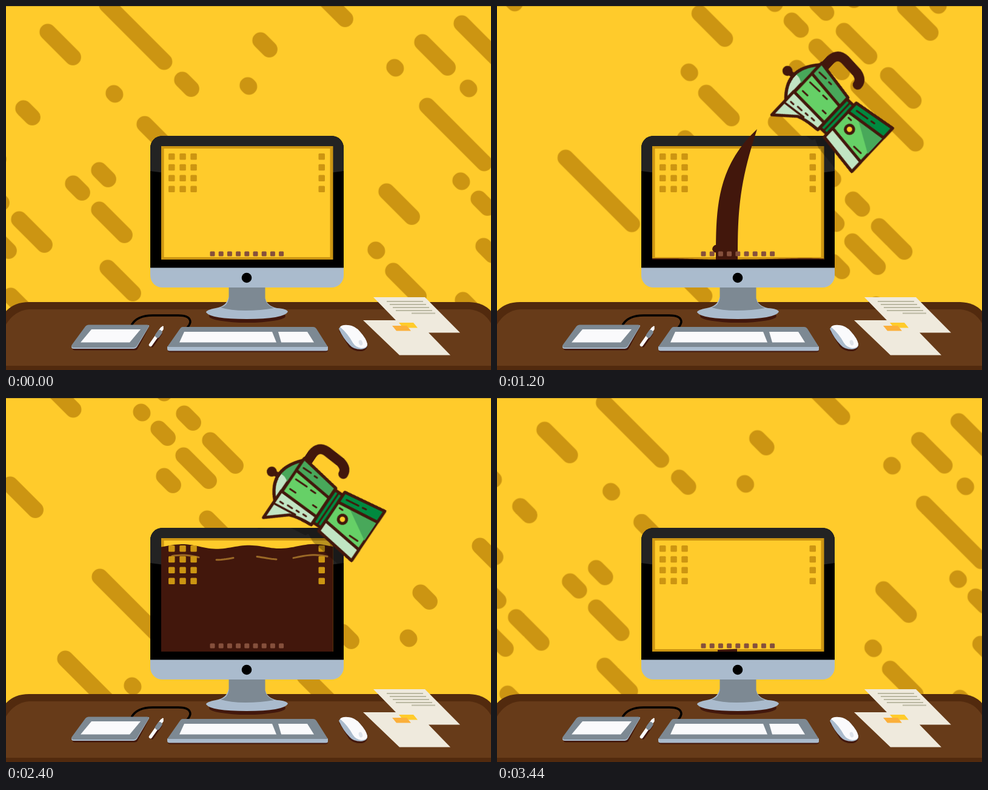
Recreate the animation shown at these times as an HTML page. Size 800 by 600 pixels, loop 3.48 s.

```html
<!DOCTYPE html>
<html lang="en">
<head>
<meta charset="utf-8">
<title>Coffee break</title>
<style>
  html, body { margin: 0; width: 100%; height: 100%; overflow: hidden; background: #ffcb2b; }
  svg { display: block; width: 800px; height: 600px; }

  #drift { animation: drift 3480ms linear infinite; }
  .move { animation: move 3480ms infinite; }
  .tilt { animation: tilt 3480ms infinite; }

  @keyframes drift { to { transform: translate(-851px, -851px); } }
  @keyframes move {
    0%, 6.9% { transform: translate(905px, 180px); animation-timing-function: cubic-bezier(.4, .2, .7, .7); }
    16.09% { transform: translate(680px, 179px); animation-timing-function: cubic-bezier(.3, .5, .5, 1); }
    23%, 64.4% { transform: translate(547px, 175px); animation-timing-function: ease-in-out; }
    68.97% { transform: translate(516.4px, 177.6px); animation-timing-function: cubic-bezier(.5, 0, .8, .7); }
    80.5%, 100% { transform: translate(905px, 180px); }
  }
  @keyframes tilt {
    0%, 10% { transform: rotate(0deg); animation-timing-function: cubic-bezier(.4, 0, .7, .6); }
    16.09% { transform: rotate(-17.5deg); animation-timing-function: cubic-bezier(.3, .5, .5, 1); }
    23%, 64.4% { transform: rotate(-46.7deg); animation-timing-function: ease-in-out; }
    68.97% { transform: rotate(-56deg); animation-timing-function: cubic-bezier(.5, 0, .8, .7); }
    80.5%, 100% { transform: rotate(0deg); }
  }
</style>
</head>
<body>
<svg viewBox="0 0 800 600">
  <defs>
    <clipPath id="case"><rect x="238" y="214" width="319" height="250" rx="20"/></clipPath>
    <clipPath id="screen"><rect x="256" y="231" width="283.500" height="187"/></clipPath>
  </defs>

  <rect width="800" height="600" fill="#ffcb2b"/>
  <g id="drift" fill="none" stroke="#cc9512" stroke-width="27" stroke-linecap="round">
    <g id="pills"></g>
    <use href="#pills" x="851" y="851"/>
  </g>
  <rect width="800" height="1" fill="#000" opacity=".2"/>

  <!-- desk -->
  <path fill="#522a0e" d="M0 503Q14 488 38 488H764Q788 489 800 503V600H0Z"/>
  <path fill="#673b19" d="M0 525Q14 502 38 500H764Q788 502 800 523V593H0Z"/>

  <!-- stand -->
  <ellipse cx="398" cy="511" rx="63" ry="11" fill="#42170c"/>
  <path fill="#aabbcd" d="M367 480Q364 495 346 498Q330 501 330 505Q338 516 397 516Q458 516 465 504Q463 499 447 498Q430 494 428 482Z"/>
  <path fill="#7d8993" d="M367.500 464H427.500V482Q429 493 442 498Q420 502 395 502Q370 502 354 497Q366 494 367.500 482Z"/>

  <!-- monitor -->
  <g clip-path="url(#case)">
    <rect x="238" y="214" width="319" height="218" fill="#000"/>
    <path fill="#232323" d="M238 214H557V272Q397 296 238 272Z"/>
    <rect x="238" y="431.500" width="319" height="33" fill="#aabbcd"/>
  </g>
  <circle cx="397" cy="448" r="8.300"/>
  <rect x="256" y="231" width="283.500" height="187" fill="#cc9512"/>
  <rect x="260.500" y="235" width="274" height="179" fill="#ffcb2b"/>

  <!-- coffee -->
  <g clip-path="url(#screen)">
    <path id="pool" fill="#42170c"/>
    <path id="glints" fill="none" stroke="#9a6826" stroke-width="3" stroke-linecap="round"/>
    <g id="splash" fill="#42170c"></g>
    <path id="rest" fill="#42170c" d="M364 415L396 413.500V418H364Z"/>
  </g>
  <path id="stream" fill="#42170c"/>
  <path id="drip" fill="#42170c" d="M11 -1Q5 -1 2 -4Q-7 -6 -7 0Q-6 6 2 4Q6 1 11 -1ZM15 0a2.500 2.500 0 1 0 5 0a2.500 2.500 0 1 0 -5 0"/>
  <g id="icons"></g>

  <g transform="translate(0 -1)">
    <!-- tablet, cable and pen -->
    <path fill="none" stroke="#000" stroke-width="3.500" d="M207 527Q216 511 242 511H284Q304 511 304 522Q303 527 299 531"/>
    <path fill="#42170c" d="M110 564H215L236 531L217 566Q216 568.500 212 568.500H113Q109 568 110 564Z"/>
    <path fill="#aabbcd" d="M108 561Q107 566 112 566H211Q214 566 216 563L236 529V527Z"/>
    <path fill="#7d8993" d="M136 526.500H233Q237 527 235 530L216 561Q214 564 211 564H111Q106 563 109 559L131 529Q133 526.500 136 526.500Z"/>
    <path fill="#fafafc" d="M141 534H222L204 555.500H123Z"/>
    <g fill="none" stroke-linecap="round">
      <path stroke="#42170c" stroke-width="5" d="M241 561L255 541"/>
      <path stroke="#fafafc" stroke-width="5.500" d="M238.500 559.500L248 546M254 537L257 533"/>
      <path stroke="#fafafc" stroke-width="3" d="M256 534L258.500 530"/>
      <path stroke="#7d8993" stroke-width="8" d="M250 544L253.500 539"/>
    </g>

    <!-- keyboard -->
    <path fill="#42170c" d="M267 566H531V569Q530 571.500 527 571.500H270Q267 571 267 568Z"/>
    <path fill="#aabbcd" d="M266 562H531V567Q531 569.500 528 569.500H269Q266 569 266 566Z"/>
    <path fill="#7d8993" d="M291 530H507Q510 530 512 533L531 563H266L287 533Q289 530 291 530Z"/>
    <path fill="#fafafc" d="M294 538H439L446 555.500H286ZM449 538H497L508 555.500H454Z"/>

    <!-- mouse -->
    <path fill="#42170c" d="M549 536L566 563Q574 571 587 570Q597 568 596 559Z"/>
    <path fill="#aabbcd" d="M549 533Q552 526 564 527Q576 528 584 538Q594 549 596 558Q597 566 585 567Q573 567 567 560Q556 549 549 533Z"/>
    <path fill="#fafafc" d="M551 530Q555 526 564 527Q576 528 584 538Q594 549 596 558Q596 565 586 565Q577 564 572 556Q564 541 551 530Z"/>
    <ellipse cx="585" cy="556" rx="3" ry="4.500" fill="#dde2ea" transform="rotate(-20 585 556)"/>
  </g>

  <!-- papers -->
  <path fill="#efeadd" d="M606 480H691L749 538.500H697L733 575.500H649L589 518H643Z"/>
  <path stroke="#bab8a2" stroke-width="2.200" d="M628 487H688M633 492H693M638 497H698M643 502H703M669 506.500H708"/>
  <path fill="#ffcb2b" d="M648 522H672L679 530.500H655Z"/>
  <path fill="#fbaf3a" d="M637 527H661L668 535.500H644Z"/>

  <!-- pot shadow on the monitor -->
  <g clip-path="url(#case)"><g transform="translate(-9 18)"><g class="move"><g class="tilt">
    <path transform="translate(-45 95) scale(.98)" opacity=".28" d="M0 2L10 -74L17 -88L12 -91L8 -125L-24 -164H12Q50 -205 92 -164L99 -161L86 -90L83 -74L89 -73L100 2Z"/>
  </g></g></g></g>

  <!-- pot -->
  <g class="move"><g class="tilt">
    <g transform="translate(-45 95) scale(.98)" stroke="#42170c" stroke-width="5" stroke-linejoin="round" stroke-linecap="round">
      <path fill="none" stroke-width="16.500" d="M99 -155L112 -155Q129 -154 129 -137L127 -108Q124 -94 113 -93"/>
      <path fill="#c1e5c3" d="M11 -163Q50 -202 93 -163Z"/>
      <path fill="#48a85a" stroke="none" d="M48 -163Q57 -172 54 -182Q74 -181 91 -163Z"/>
      <path fill="none" d="M11 -163Q50 -202 93 -163"/>
      <path stroke-width="9" d="M49 -193L50 -184"/>
      <circle cx="49" cy="-195" r="6" fill="#42170c"/>

      <path fill="#00893f" d="M17 -90H83V-73H17Z"/>
      <path fill="none" stroke-width="3" d="M18 -81.500H82"/>

      <path fill="#66d067" d="M5 -162H98L86 -90H12Z"/>
      <path fill="#48a85a" d="M74 -162H98L86 -90H66Z"/>
      <path fill="#c1e5c3" d="M-23 -163.500H31L28 -90H12Q11 -115 5 -130Z"/>
      <path fill="none" stroke-width="3.500" d="M7 -160L11 -122"/>
      <path fill="none" stroke-width="3" d="M15 -155V-149M17 -141V-132M18 -124V-119M19 -111V-105M42 -153V-142M61 -154V-132M60 -123V-114M84 -154V-139M83 -131V-126M41 -106V-99"/>

      <path fill="#66d067" d="M10.500 -73.500H89L100 0H0Z"/>
      <path fill="#48a85a" stroke="none" d="M40 -1H78L72 -54Z"/>
      <path fill="#00893f" d="M69 -73.500H89L100 0H78Z"/>
      <path fill="#c1e5c3" d="M10.500 -73.500H31L22 0H0Z"/>
      <path fill="none" stroke-width="3" d="M33 -10V-26M80 -64L83 -42M84 -34L85 -28M62 -66V-60"/>
      <circle cx="49" cy="-51.500" r="7" fill="#ffcb2b"/>
    </g>
  </g></g>
</svg>

<script>
const LOOP = 3480;
const $ = id => document.getElementById(id);
const make = (parent, tag, attrs) => {
  const el = document.createElementNS('http://www.w3.org/2000/svg', tag);
  for (const k in attrs) el.setAttribute(k, attrs[k]);
  return parent.appendChild(el);
};

// Start points of the diagonal pills, grouped by run length.
const dots = [641,101, 762,135, 399,131, 178,144, 838,240, 992,257, 1020,291, 750,288, 610,402, 810,610, -56,210, -110,290];
const short = [420,57, 291,122, 29,169, -27,238, 154,271, 111,293, -22,310, 780,318, 788,396, 822,290, 868,269,
  891,167, 839,638, 881,613, 549,688, 848,716, -81,319];
const medium = [69,43, 518,-20, 687,60, 154,336, 22,352, -37,362, 168,432, 8,478, 628,306, 126,516, 900,227,
  967,296, 866,335, 821,361, 939,408, 859,465, 924,657, 880,682, 232,622, 919,786, 594,730, 639,437];
const long = [167,-2, 752,29, 229,195, 695,165, 890,426, 754,485, 604,512, -109,31];
const longest = [407,544, -166,166];

function pills(points, run) {
  let d = '';
  for (let i = 0; i < points.length; i += 2) d += `M${points[i]} ${points[i + 1]}l${run} ${run}`;
  make($('pills'), 'path', { d });
}
pills(dots, 2);
pills(short, 14.5);
pills(medium, 41.5);
pills(long, 94);
pills(longest, 109);

const icon = (x, y, size, fill) => make($('icons'), 'rect', { x, y, width: size, height: size, rx: 1.5, fill });
for (let row = 0; row < 4; row++)
  for (const x of [268, 286.3, 304.3, 515.5]) icon(x, 243 + row * 17.8, 10.5, '#cc9512');
for (let i = 0; i < 9; i++) icon(336.5 + i * 14.2, 404.5, 8, '#85503c');

// Pool states: time, level, long wave, short wave, glint depth
const states = [
  [1010, 424, 0, 0, 4],
  [1560, 403.5, 2.8, 0.5, 4],
  [2400, 245, 1, 3.2, 18],
  [2960, 379.5, 10, 0, 14],
  [3260, 430, 6, 0, 14]
];
const smooth = p => p * p * (3 - 2 * p);
const eases = [p => p, smooth, p => p * p * (1.9 - 0.9 * p), p => p];

function poolAt(t) {
  if (t < states[0][0] || t >= states[4][0]) return null;
  const i = states.findIndex((s, n) => t < states[n + 1][0]);
  const a = states[i], b = states[i + 1];
  const p = eases[i]((t - a[0]) / (b[0] - a[0]));
  return a.map((v, k) => v + (b[k] - v) * p);
}

function drawPool(t) {
  const s = poolAt(t);
  if (!s) {
    $('pool').setAttribute('d', '');
    $('glints').setAttribute('d', '');
    return;
  }
  const [, level, big, small, depth] = s;
  const surface = x => level - big * Math.cos((x - 265) * Math.PI / 122) - small * Math.cos((x - 292) * Math.PI / 54);
  const trace = (from, to, dy) => {
    let d = '';
    for (let x = from; x <= to; x += 4) d += `${d ? 'L' : 'M'}${x} ${(surface(x) + dy).toFixed(2)}`;
    return d;
  };
  $('pool').setAttribute('d', trace(254, 542, 0) + 'V420H254Z');
  $('glints').setAttribute('d', [[274, 318], [347, 377], [414, 446], [474, 532]]
    .map(([a, b]) => trace(a, b, depth)).join(''));
}

function drawStream(t) {
  let d = '';
  if (t > 810 && t < 2340) {
    const head = Math.min(418, 203 + 59 * ((t - 800) / 80) ** 1.4);
    const top = 203 + 215 * Math.max(0, (t - 2160) / 180) ** 1.5;
    const grow = Math.min(1, Math.max(0, t - 880) / 160);
    const rest = (y, from) => Math.max(0, 1 - (y - from) / (418 - from));
    const mid = y => 379 + 50 * rest(y, 203) ** (5 - 2 * grow);
    const half = y => (12.5 + 5.5 * grow) * (1 - rest(y, top) ** 4.5);
    const left = [], right = [];
    for (let i = 0; i <= 40 && head > top; i++) {
      const y = top + (head - top) * i / 40;
      left.push(`${(mid(y) - half(y)).toFixed(2)} ${y.toFixed(2)}`);
      right.unshift(`${(mid(y) + half(y)).toFixed(2)} ${y.toFixed(2)}`);
    }
    const r = half(head).toFixed(2);
    const cap = head < 418 ? `A${r} ${r} 0 0 0 ` : 'L';
    if (head > top) d = `M${left.join('L')}${cap}${right.join('L')}Z`;
  }
  $('stream').setAttribute('d', d);
}

// Splash drops: reach, height, phase
const drops = [[-117, 61, .658], [-117, 31, .858], [130, 60, .558], [124, 52, .658]].map(([reach, rise, phase]) => ({
  reach, rise, phase,
  el: make($('splash'), 'path', { d: 'M-12 0Q-5 -2 0 -6.5Q7.500 -6.500 7.500 0Q7.500 6.500 0 6.500Q-6 5.500 -12 0Z' })
}));

function drawSplash(t) {
  const pool = poolAt(t);
  const on = pool && t > 1060 && t < 2260;
  for (const { reach, rise, phase, el } of drops) {
    const age = (t - 1060) / 480 + phase;
    const a = age % 1;
    el.style.display = on && age >= 1 ? '' : 'none';
    if (!on) continue;
    const x = 380 + reach * a;
    const y = pool[1] - 4 * rise * a * (1 - a);
    const angle = Math.atan2(-5 * rise * (1 - 2 * a), reach) * 180 / Math.PI;
    el.setAttribute('transform', `translate(${x} ${y}) rotate(${angle})`);
  }
}

function drawDrip(t) {
  const dt = t - 880;
  const size = Math.min(1, (t - 800) / 60, (1080 - t) / 120);
  $('drip').style.display = size > 0 ? '' : 'none';
  if (size > 0)
    $('drip').setAttribute('transform', `translate(${443 - dt * .2} ${159 - dt * .05 + dt * dt * .001}) scale(${size})`);
}

let start;
function frame(now) {
  start ??= now;
  const t = (now - start) % LOOP;
  drawPool(t);
  drawStream(t);
  drawSplash(t);
  drawDrip(t);
  $('rest').style.display = t >= 3380 ? '' : 'none';
  requestAnimationFrame(frame);
}
requestAnimationFrame(frame);
</script>
</body>
</html>
```
